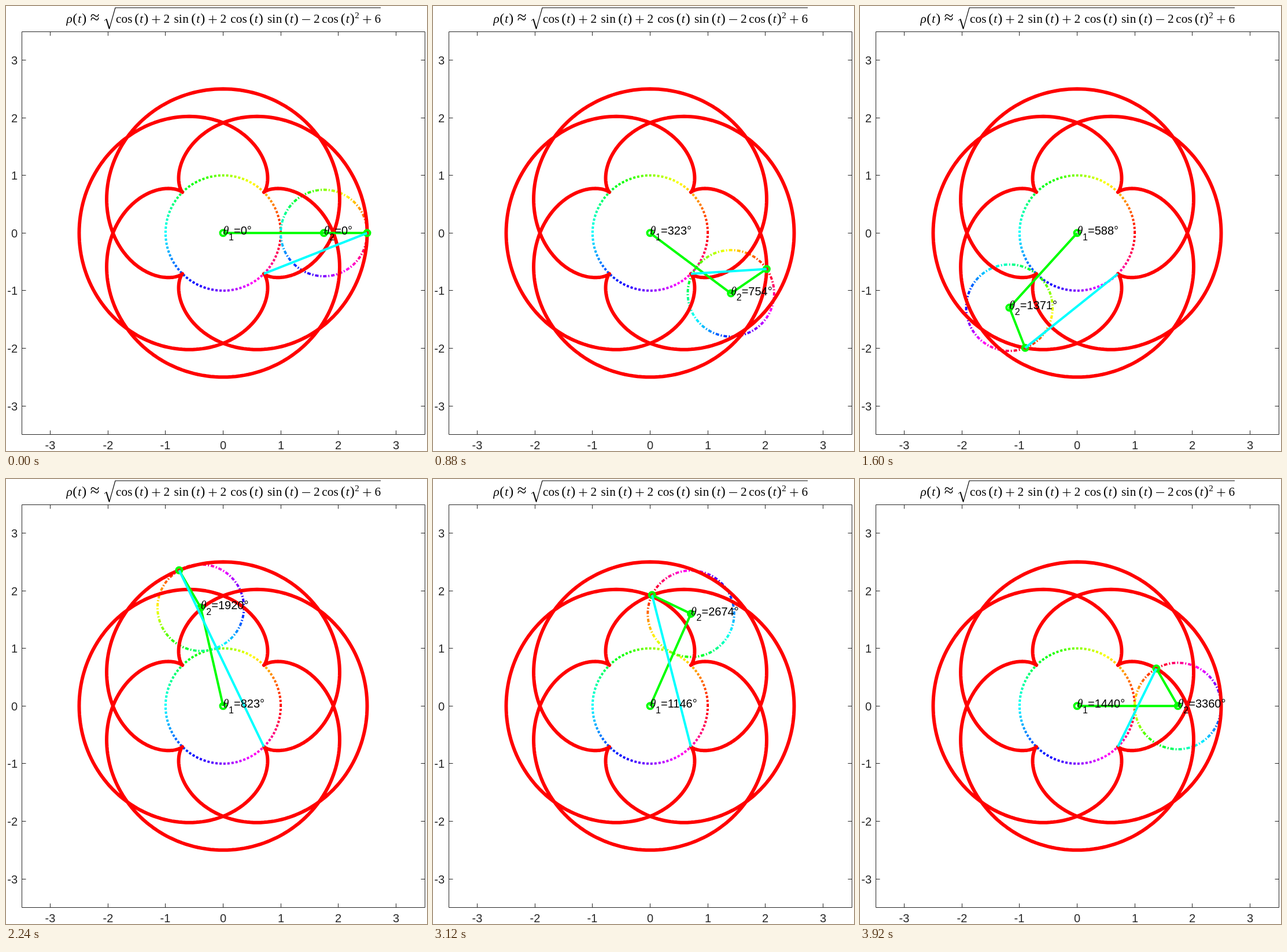
Animation of 728 by 769 pixels, one loop 4000 ms. Source, as an HTML page with a canvas:

```html
<!DOCTYPE html>
<html lang="en">
<head>
<meta charset="utf-8">
<title>Epicycloid linkage</title>
<style>
html, body { margin: 0; width: 100%; height: 100%; overflow: hidden; background: #fff; }
canvas { display: block; }
</style>
</head>
<body>
<canvas id="stage" width="728" height="769"></canvas>
<script>
const ctx = document.getElementById('stage').getContext('2d');
const CX = 375.5, CY = 392.3, UNIT = 99.6;
const ARM = 1.75, PEN = 0.75, RATIO = 7 / 3;
const FRAMES = 50, FRAME_MS = 80, TURN = 2 * Math.PI;
const SANS = '"Liberation Sans", Arial, sans-serif';
const SERIF = '"Liberation Serif", "Times New Roman", serif';

const px = x => CX + UNIT * x;
const py = y => CY - UNIT * y;
const armEnd = a => [ARM * Math.cos(a), ARM * Math.sin(a)];
const penEnd = a => {
  const [x, y] = armEnd(a);
  return [x + PEN * Math.cos(RATIO * a), y + PEN * Math.sin(RATIO * a)];
};

function polyline(points, color, width) {
  ctx.beginPath();
  for (const [x, y] of points) ctx.lineTo(x, y);
  ctx.strokeStyle = color;
  ctx.lineWidth = width;
  ctx.stroke();
}

const plot = (points, color, width) =>
  polyline(points.map(([x, y]) => [px(x), py(y)]), color, width);

function text(str, x, y, font, align = 'left', color = '#000') {
  ctx.font = font;
  ctx.textAlign = align;
  ctx.fillStyle = color;
  ctx.fillText(str, x, y);
}

// Title: each glyph is centred in its typeset slot, measured in em.
const EM = 21.35, BASE = 29;
const SLOTS = {
  c: .444, o: .5, s: .394, i: .278, n: .556, 2: .5, 6: .5, '(': .389, ')': .389,
  t: .361, 'ρ': .517, '≈': 1.334, '+': 1.222, '−': 1.222, ' ': .167, '²': .4
};

function formula(str, x) {
  for (const ch of str) {
    const w = SLOTS[ch] * EM, mid = x + w / 2, axis = BASE - 5.5;
    if (ch === '+' || ch === '−') {
      polyline([[mid - 7, axis], [mid + 7, axis]], '#000', 1.1);
      if (ch === '+') polyline([[mid, axis - 7], [mid, axis + 7]], '#000', 1.1);
    } else if (ch === '²') {
      text('2', mid, BASE - 8, `15px ${SERIF}`, 'center');
    } else {
      const style = 'tρ'.includes(ch) ? 'italic ' : '';
      const size = ch === '≈' ? 29 : '()'.includes(ch) ? 24 : EM;
      text(ch, mid, BASE, `${style}${size}px ${SERIF}`, 'center');
    }
    x += w;
  }
}

function title() {
  formula('ρ(t)≈', 104);
  polyline([[170, 25.5], [173.5, 22.5]], '#000', 1);
  polyline([[173.5, 22.5], [178.5, 39]], '#000', 2);
  polyline([[178.5, 40], [189, 3], [648, 3]], '#000', 1.1);
  formula('cos (t)+2  sin (t)+2  cos (t)  sin (t)−2 cos (t)²+6', 190);
}

function axes() {
  const ink = '#262626', font = `20px ${SANS}`;
  const left = 27.5, right = 724.5, top = 44.5, bottom = 740.5, tick = 7;
  polyline([[left, top], [right, top], [right, bottom], [left, bottom], [left, top]], ink, 1);
  for (let v = -3; v <= 3; v++) {
    const x = Math.floor(px(v)) + .5, y = Math.floor(py(v)) + .5;
    polyline([[x, top], [x, top + tick]], ink, 1);
    polyline([[x, bottom], [x, bottom - tick]], ink, 1);
    polyline([[left, y], [left + tick, y]], ink, 1);
    polyline([[right, y], [right - tick, y]], ink, 1);
    text(v, x, 766, font, 'center', ink);
    text(v, 20, y + 7, font, 'right', ink);
  }
}

const rainbow = ctx.createConicGradient(0, 0, 0);
for (let i = 0; i <= 6; i++) rainbow.addColorStop(i / 6, `hsl(${i * 60} 100% 50%)`);

function wheel([x, y], radius, angle, dash) {
  ctx.save();
  ctx.translate(px(x), py(y));
  ctx.scale(1, -1);
  ctx.rotate(angle);
  ctx.setLineDash(dash);
  ctx.strokeStyle = rainbow;
  ctx.lineWidth = 4;
  ctx.beginPath();
  ctx.arc(0, 0, radius * UNIT, 0, TURN);
  ctx.stroke();
  ctx.restore();
}

function joint([x, y]) {
  ctx.beginPath();
  ctx.arc(px(x), py(y), 5, 0, TURN);
  ctx.strokeStyle = '#0f0';
  ctx.lineWidth = 4;
  ctx.stroke();
}

function angleLabel([x, y], index, degrees) {
  const left = px(x), base = py(y) + 3;
  text('θ', left, base, `italic 20px ${SERIF}`);
  text(index, left + 9.5, base + 9.5, `16px ${SANS}`);
  text(`=${Math.round(degrees)}°`, left + 18.5, base, `20px ${SANS}`);
}

const curve = Array.from({ length: 901 }, (_, i) => penEnd(i / 900 * 3 * TURN));
const anchor = [Math.SQRT1_2, -Math.SQRT1_2];
const origin = [0, 0];

function draw() {
  const step = Math.floor(performance.now() / FRAME_MS) % FRAMES;
  const degrees = 1440 * step / (FRAMES - 1);
  const angle = degrees * Math.PI / 180;
  const elbow = armEnd(angle), pen = penEnd(angle);

  ctx.fillStyle = '#fff';
  ctx.fillRect(0, 0, 728, 769);
  ctx.lineJoin = 'round';
  title();
  axes();
  wheel(origin, 1, 0, [4, 3]);
  wheel(elbow, PEN, RATIO * angle, [6, 3, 2, 3]);
  plot(curve, '#f00', 6);
  plot([origin, elbow, pen], '#0f0', 4);
  [origin, elbow, pen].forEach(joint);
  plot([anchor, pen], '#0ff', 4);
  angleLabel(origin, 1, degrees);
  angleLabel(elbow, 2, RATIO * degrees);
  requestAnimationFrame(draw);
}
draw();
</script>
</body>
</html>
```
